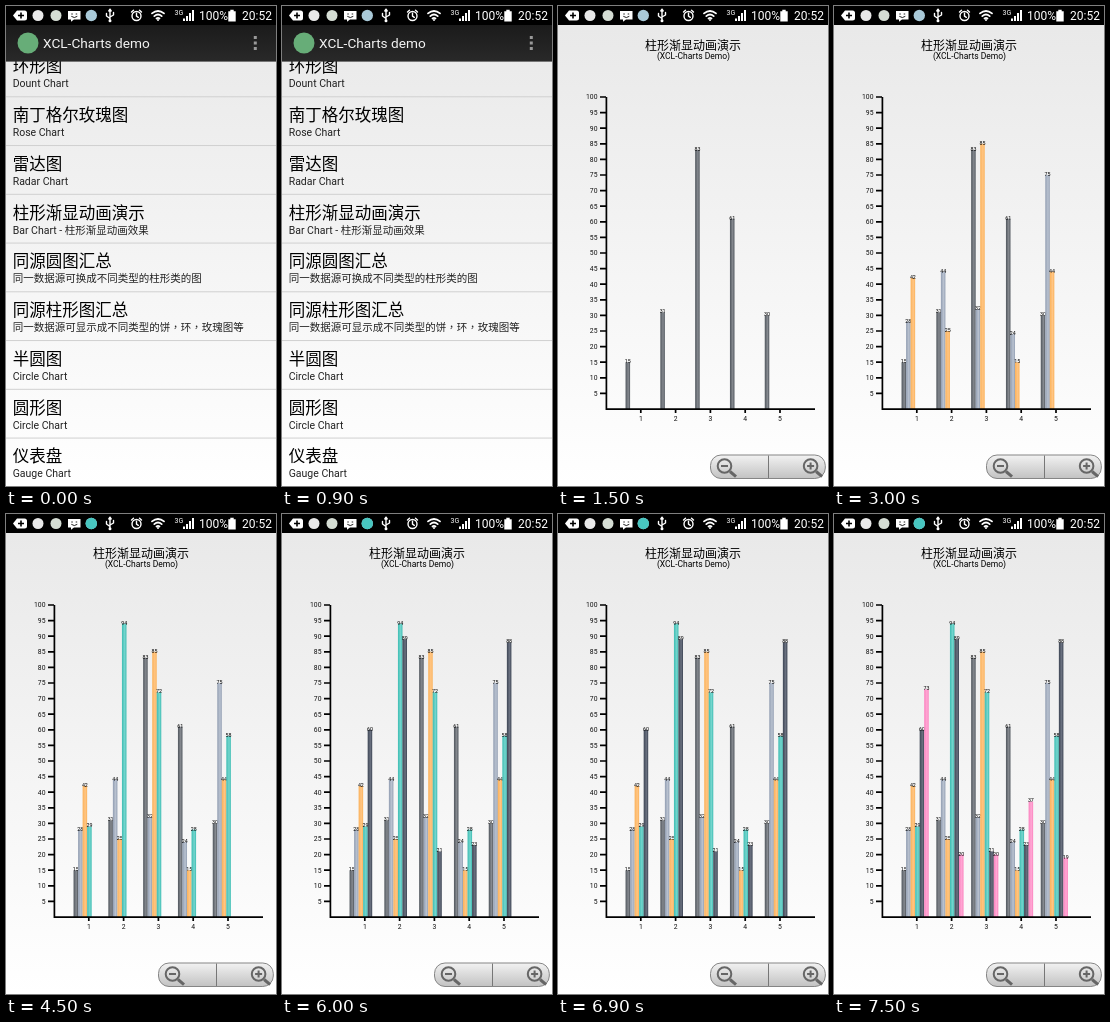
Recreate the animation shown at these times as an HTML page. Size 270x480 px, loop 8000 ms.

```html
<!DOCTYPE html>
<html lang="zh-CN">
<head>
<meta charset="utf-8">
<title>XCL-Charts demo</title>
<style>
html, body { margin: 0; width: 100%; height: 100%; overflow: hidden; background: #fff; }
svg { display: block; width: 100vw; height: 100vh; }
text { font-family: Roboto, "Noto Sans CJK SC", "Noto Sans CJK", sans-serif; }
.comma { font-family: "Noto Sans CJK TC", "Noto Sans CJK", sans-serif; }
.line { fill: none; stroke: #fff; stroke-width: 1.4; stroke-linecap: round; stroke-linejoin: round; }
</style>
</head>
<body>
<svg viewBox="0 0 270 480">
  <defs id="defs">
    <linearGradient id="page" x2="0" y2="1">
      <stop stop-color="#e8e8e8"/><stop offset="1" stop-color="#fff"/>
    </linearGradient>
    <linearGradient id="button" x2="0" y2="1">
      <stop stop-color="#f2f2f2"/><stop offset=".5" stop-color="#dadada"/><stop offset="1" stop-color="#c2c2c2"/>
    </linearGradient>
    <linearGradient id="actionbar" x2="0" y2="1">
      <stop stop-color="#1b1b1b"/><stop offset="1" stop-color="#292929"/>
    </linearGradient>
  </defs>
  <rect width="270" height="480" fill="url(#page)"/>

  <g id="chart">
    <g id="series"></g>
    <g id="axes"></g>
    <g id="zoom">
      <rect x="152.5" y="449" width="114.8" height="23.5" rx="10.5" fill="url(#button)" stroke="#858585"/>
      <path d="M210.5 449.5V472" stroke="#777"/>
      <g fill="none" stroke="#666" stroke-width="2">
        <circle cx="166.5" cy="460" r="6.8"/><path d="M172 465.5l6 5.2" stroke-width="3"/><path d="M163 460h7"/>
        <circle cx="252.6" cy="460" r="6.8"/><path d="M258.1 465.5l6 5.2" stroke-width="3"/><path d="M249.1 460h7M252.6 456.5v7"/>
      </g>
    </g>
  </g>

  <g id="list">
    <rect width="270" height="480" fill="url(#page)"/>
    <g id="rows"></g>
    <rect y="19" width="270" height="36.6" fill="url(#actionbar)"/>
    <circle cx="22" cy="37" r="10.5" fill="#67ad78"/>
    <text x="37" y="41.8" font-size="13.65" fill="#f3f3f3">XCL-Charts demo</text>
    <path d="M247.8 30h3v3h-3zM247.8 35.5h3v3h-3zM247.8 41h3v3h-3z" fill="#999"/>
  </g>

  <g id="status">
    <rect width="270" height="19" fill="#000"/>
    <path d="M7 9.5L11 4.5H18.5Q21 4.5 21 7V12Q21 14.5 18.5 14.5H11Z" fill="#fff"/>
    <path d="M12 9.5h6M15 6.5v6" stroke="#000" stroke-width="1.6"/>
    <circle cx="32" cy="9.5" r="5.5" fill="#e8e8e8"/>
    <circle cx="50" cy="9.5" r="5.5" fill="#d5ddd4"/>
    <path d="M62 5h12.5v8.5H68l-3 2.3v-2.3h-3z" fill="#fff"/>
    <path d="M65.3 8h1.5M69.7 8h1.5M65.3 10.3q3 2.5 6 0" fill="none" stroke="#222"/>
    <circle cx="85.3" cy="9.5" r="5.7" fill="#a9c9d8"/>
    <circle id="badge" cx="85.3" cy="9.5" r="5.7" fill="#48c6c0"/>
    <g class="line">
      <path d="M104 4V15M104 12.5L100.5 10V7.5M104 11L107.5 9V6.5M102.8 5L104 3.2L105.2 5"/>
      <circle cx="104" cy="14.8" r=".8"/>
      <circle cx="130.5" cy="10" r="4.5"/>
      <path d="M130.5 7.3V10.2L132.3 11.3M125.5 6L127.5 4.2M135.5 6L133.5 4.2"/>
    </g>
    <g class="line" style="stroke-width:1.8">
      <path d="M146 7.4Q152 2.5 158 7.4M148.3 10.1Q152 7 155.7 10.1M150.5 12.5Q152 11.3 153.5 12.5"/>
    </g>
    <circle cx="152" cy="14" r="1" fill="#fff"/>
    <text x="168.5" y="8.5" font-size="7" fill="#fff">3G</text>
    <path d="M177 15h2v-2.5h-2zM180 15h2V10h-2zM183 15h2V7h-2zM186 15h2V4h-2z" fill="#fff"/>
    <text x="193" y="14" font-size="12" fill="#fff">100%</text>
    <path d="M222.3 5.3h2V3.8h3.4v1.5h2V15.5h-7.4z" fill="#fff"/>
    <text x="236" y="14" font-size="12" fill="#fff">20:52</text>
  </g>
</svg>
<script>
const LOOP = 8000;
const STEP = 1500;
const $ = id => document.getElementById(id);
const text = (x, y, size, label, anchor = "start", fill = "#111") =>
  `<text x="${x}" y="${y}" font-size="${size}" text-anchor="${anchor}" fill="${fill}">${label}</text>`;

// Demo list, with commas centred in their cell
const rows = [
  ["环形图", "Dount Chart"],
  ["南丁格尔玫瑰图", "Rose Chart"],
  ["雷达图", "Radar Chart"],
  ["柱形渐显动画演示", "Bar Chart - 柱形渐显动画效果"],
  ["同源圆图汇总", "同一数据源可换成不同类型的柱形类的图"],
  ["同源柱形图汇总", "同一数据源可显示成不同类型的饼，环，玫瑰图等"],
  ["半圆图", "Circle Chart"],
  ["圆形图", "Circle Chart"],
  ["仪表盘", "Gauge Chart"]
];
const comma = '<tspan class="comma" lang="zh-TW">，</tspan>';
$("rows").innerHTML = rows.map(([title, note], i) => {
  const y = 66.4 + i * 48.75;
  return text(6.7, y, 16.5, title, "start", "#000") +
    text(6.7, y + 15, 10.5, note.replaceAll("，", comma), "start", "#222") +
    `<path d="M0 ${y + 24.4}H270" stroke="#d0d0d0"/>`;
}).join("");

// Chart frame
const LEFT = 48, BASE = 403, UNIT = 3.12, GROUP = 34.8, BAR = 4.53;
let axes = text(135, 43.5, 12, "柱形渐显动画演示", "middle", "#000") +
  text(135.5, 52.8, 8.5, "(XCL-Charts Demo)", "middle", "#000");
let ticks = `M${LEFT + .4} 91V${BASE + .2}H257`;
for (let v = 5; v <= 100; v += 5) {
  const y = BASE - v * UNIT;
  ticks += `M42 ${y}H${LEFT}`;
  axes += text(39.5, y + 2.4, 6.8, v, "end");
}
for (let i = 1; i <= 5; i++) {
  const x = LEFT + i * GROUP;
  ticks += `M${x} ${BASE}v4`;
  axes += text(x, 414.6, 6.8, i, "middle");
}
$("axes").innerHTML = axes + `<path d="${ticks}" fill="none" stroke="#000" stroke-width="1.7"/>`;

// Bar series: step of appearance, edge colour, middle colour, values
const series = [
  [1, "#50565d", "#868a90", [15, 31, 83, 61, 30]],
  [2, "#929eb2", "#b9c2d0", [28, 44, 32, 24, 75]],
  [2, "#fbb25b", "#ffc583", [42, 25, 85, 15, 44]],
  [3, "#3dbdb3", "#75d5cd", [29, 94, 72, 28, 58]],
  [4, "#3d4554", "#6a7180", [60, 89, 21, 23, 88]],
  [5, "#fb82bf", "#ffa8d4", [73, 20, 20, 37, 19]]
];
$("defs").innerHTML += series.map(([, edge, middle], s) =>
  `<linearGradient id="tone${s}"><stop stop-color="${edge}"/>` +
  `<stop offset=".6" stop-color="${middle}"/><stop offset="1" stop-color="${edge}"/></linearGradient>`).join("");
$("series").innerHTML = series.map(([, , , values], s) => "<g>" + values.map((v, i) => {
  const x = 67.55 + i * GROUP + s * BAR, y = BASE - v * UNIT;
  return `<rect x="${x}" y="${y}" width="${BAR}" height="${v * UNIT}" fill="url(#tone${s})"/>` +
    text(x + BAR / 2, y + .9, 5.3, v, "middle", "#000");
}).join("") + "</g>").join("");

// Hard cuts between hidden and shown
function cut(element, step, before, after) {
  const offset = step * STEP / LOOP;
  element.animate([
    { opacity: before, offset: 0 }, { opacity: before, offset },
    { opacity: after, offset }, { opacity: after, offset: 1 }
  ], { duration: LOOP, iterations: Infinity });
}
cut($("list"), 1, 1, 0);
cut($("badge"), 3, 0, 1);
series.forEach(([step], s) => cut($("series").children[s], step, 0, 1));
</script>
</body>
</html>
```
